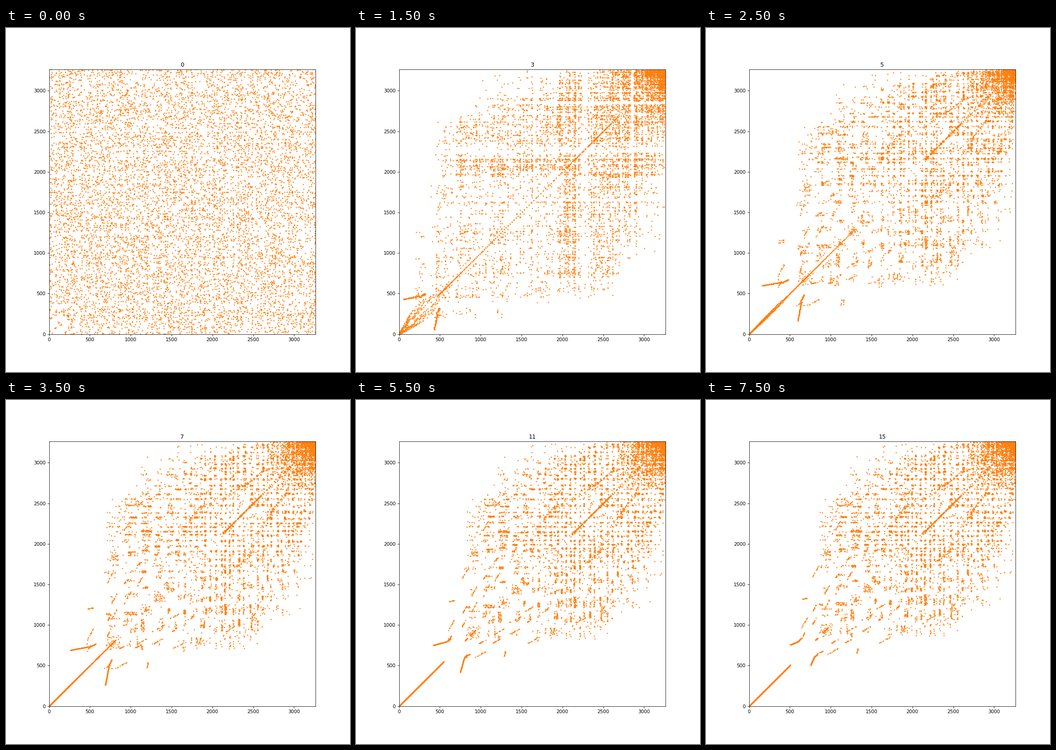
Animation of 748x748 px, one loop 8 s. Source, as a matplotlib script:

```python
import numpy as np
import matplotlib.pyplot as plt
from matplotlib.animation import FuncAnimation

N = 3264
STEPS = 16
rng = np.random.default_rng(12)
edges = []


def add(x, y):
    """Store undirected edges between settled ranks x and y."""
    pair = np.stack(np.broadcast_arrays(x, y))
    edges.append(np.clip(np.rint(pair), 0, N - 1).astype(int))


def arc(x, y, dx, dy, n, s):
    """Edges along a band from (x, y) to (x + dx, y + dy), spread s."""
    t = rng.random(n)
    add(x + t * dx + s * rng.normal(size=n), y + t * dy + s * rng.normal(size=n))


def chain(lo, hi, n):
    """Neighbouring ranks joined along the diagonal."""
    left = 2 * rng.integers(lo // 2, hi // 2, n)
    add(left, left + 1)


def reach(x):
    """Highest hub that a leaf at x usually connects to."""
    return 2300 + 0.55 * (x - 860)


def make_blocks(x):
    """Wide leaf blocks first, then ever narrower hub blocks."""
    while x < N - 20:
        size = 40 + 150 * np.clip((1900 - x) / 800, 0, 1)
        width = size * rng.uniform(0.4, 1)
        yield x, min(x + width, N)
        x += width + rng.uniform(10, 45)


# small components: pairs, paths of three, paths of four
chain_ids = np.arange(0, 500, 2)
add(chain_ids, chain_ids + 1)
leaf = np.arange(105)
add(500 + leaf, 755 + leaf * 45 // 105)
end = np.arange(31)
add(605 + end, 800 + end * 1.15)

# diagonals
chain(815, 840, 12)
chain(905, 970, 25)
chain(2125, 2600, 110)
arc(2125, 2125, 475, 475, 60, 5)
arc(2600, 2600, 400, 400, 40, 8)
arc(2310, 2680, 390, 250, 60, 10)
arc(1790, 2300, 170, 200, 25, 12)

# short curved runs on the sparse fringe
for x in np.linspace(640, 1200, 5):
    for ratio in (1.3, 1.5, 2.05):
        slope = rng.choice([0.25, 1, 1.8])
        span = rng.uniform(40, 90)
        arc(x, x * ratio, span, span * slope, 11, 2)

# leaf and hub blocks joined by streaks
blocks = list(make_blocks(850))
hubs = [rng.uniform(lo, hi, 3 + int(hi - lo) // 25) for lo, hi in blocks]

for i, (lo, hi) in enumerate(blocks):
    if hi - lo > 80:
        add(rng.uniform(lo, hi, 16), rng.uniform(lo, hi, 16))
    for j in range(i + 1, len(blocks)):
        over = max(0, np.mean(blocks[j]) - reach((lo + hi) / 2))
        ramp = np.clip((lo - 600) / 700, 0.2, 1)
        mean = (3.5 + 0.05 * (hi - lo)) * ramp * np.exp(-over / 160)
        n = int(rng.exponential(mean) + 0.4)
        width = (hi - lo) * rng.uniform(0.35, 1)
        start = lo + (hi - lo - width) * rng.random()
        row = rng.choice(rng.choice(hubs[j], 2), n)
        add(start + width * rng.random(n), row + rng.normal(0, 3.5, n))

# loose links, core grid and the solid corner
x, y = rng.uniform(1000, N, 800), rng.uniform(1700, N, 800)
keep = (x < y) & (y < reach(x) + 150)
add(x[keep], y[keep])
grid = np.sort(2560 + (N - 2560) * np.sqrt(rng.random(110)))
pick = (110 * rng.random((2, 620)) ** 0.6).astype(int)
add(*(grid[pick] + rng.normal(0, 2, pick.shape)))
add(*(N - rng.exponential(45, (2, 280))))

a, b = np.concatenate(edges, axis=1)
src, dst = np.append(a, b), np.append(b, a)

# shuffled start, with the two busiest nodes at chosen rows
home = rng.permutation(N)
busy = np.argsort(-np.bincount(src, minlength=N))
for node, row in zip(busy, (1750, 2140)):
    other = np.flatnonzero(home == row)[0]
    home[node], home[other] = home[other], home[node]

rank = np.arange(N, dtype=float)
noise = np.repeat(rng.normal(size=N // 4), 4)
u = (np.arange(500) // 2 + 0.5) / 250
gap = np.repeat(rng.uniform(0.05, 0.4, 250), 2) * np.tile([1, -1], 250)


def place(k):
    """Position of every node after k sorting passes."""
    if k == 0:
        return home
    t = max(k, 3)
    age = t - 3
    left = (15 - t) / 12
    ease = left ** 4

    sink = 435 * left ** 2.2
    p = rank - sink * np.clip((2100 - rank) / 1460, 0, 1) ** 0.7
    loose = np.clip((rank - 640) / 800, 0.05, 1) * np.where(rank > 2400, 0.4, 1)
    p += loose * (170 * np.exp(-1.25 * age) * noise
                  + 18 * np.sin(rank / 70 + 0.5 * t) * np.exp(-age / 6))

    # pairs close up and slide down the diagonal
    q = 500 * u + 2050 * np.exp(-0.47 * age) * u ** 5
    split = gap * np.exp(-age) * np.sqrt(np.clip(1 - q / 470, 0, 1))
    p[:500] = q * (1 + split) + np.sign(gap) * 0.5

    # path ends and their centres climb to rest
    p[500:636] = np.linspace(505 - 450 * left ** 1.5, 635 - 305 * ease, 136)
    p[755:841] = np.linspace(755 - 320 * ease, 840 - 340 * ease, 86)
    p[500:841] += 6 * ease * noise[500:841]

    p = np.abs(N - 1 - np.abs(N - 1 - p))
    if k < 3:
        mix = 0.45 if k == 1 else 0.15
        p = np.argsort(np.argsort((1 - mix) * p + mix * home))
    return p


fig, ax = plt.subplots(figsize=(10, 10), dpi=74.8)
dots, = ax.plot([], [], "o", color="C1", ms=1, mew=1.5)
ax.set(xlim=(0, N), ylim=(0, N),
       xticks=range(0, 3001, 500), yticks=range(0, 3001, 500))
title = ax.set_title("0")


def draw(k):
    p = place(k)
    dots.set_data(p[src], p[dst])
    title.set_text(str(k))
    return dots, title


anim = FuncAnimation(fig, draw, frames=STEPS, interval=500, repeat=True,
                     repeat_delay=0, blit=False)
plt.show()
```
